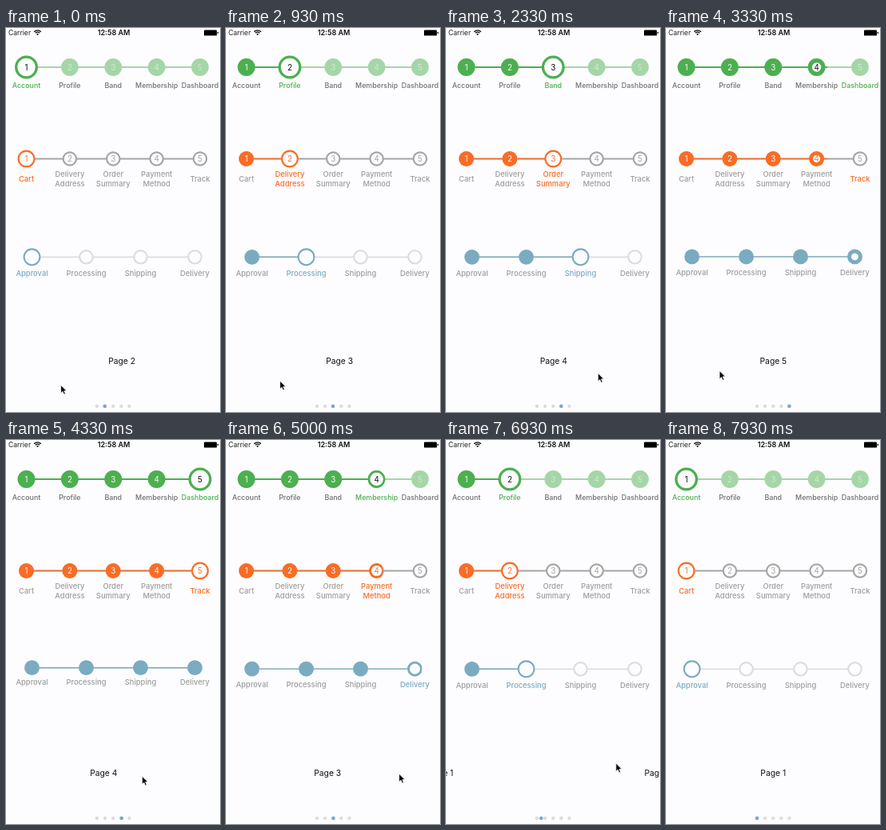
These frames come from a looping animation (268x480 px, 8.34 s). An HTML page:

```html
<!DOCTYPE html>
<html lang="en">
<head>
<meta charset="utf-8">
<title>Step progress bars</title>
<style>
html, body { margin: 0; width: 100%; height: 100%; overflow: hidden; background: #fdfcfe; }
svg { display: block; width: 100%; height: 100%; }
text { font-family: Inter, Roboto, sans-serif; text-anchor: middle; }
</style>
</head>
<body>
<svg id="stage" viewBox="0 0 268 480"></svg>
<script>
const LOOP = 8340, STEP_MS = 410, DRAG_MS = 300, SETTLE_MS = 540;
const PAGES = 5, PAGE_GAP = 272, PAPER = '#fdfcfe';
const stage = document.getElementById('stage');

// Times at which swipes settle: four forward, then four back.
const swipes = [305, 1203, 2335, 3230, 4644, 5260, 6510, 7501]
  .map((at, i) => ({ at, dir: i < 4 ? 1 : -1 }));

// The pointer drags across for each swipe, drifts up slowly, then leaves at the top.
const pointerKeys = swipes.flatMap(({ at, dir }) => {
  const end = at - SETTLE_MS, start = end - DRAG_MS;
  const key = (t, side) => ({ t, x: 142 + side * 75, y: 445 - t / 170 });
  return [key(start, dir), key(end, -dir)];
}).concat({ t: 7780, x: 240, y: 5 });

const thin = {
  text: '#9d9d9d', hollow: true, line: 1.4, idleLine: 1.8,
  r: 9.4, idleR: 8.2, ring: 9.9, ringW: 2.1, font: 9.4
};
const bars = [
  { y: 49, from: 25.5, to: 243, labels: ['Account', 'Profile', 'Band', 'Membership', 'Dashboard'],
    main: '#4caf50', idle: '#a5d6a7', idleNum: '#cfe9d0', selNum: '#111', text: '#707070',
    line: 2.1, idleLine: 2.1, r: 10.9, idleR: 10.9, ring: 12.8, ringW: 3.3, font: 8.9, base: 75 },
  { ...thin, y: 163.5, from: 25.5, to: 243,
    labels: ['Cart', 'Delivery|Address', 'Order|Summary', 'Payment|Method', 'Track'],
    main: '#f96c26', idle: '#a6a6a6', idleNum: '#a6a6a6', selNum: '#f07a3c', base: 192 },
  { ...thin, y: 286.3, from: 32.5, to: 236.5,
    labels: ['Approval', 'Processing', 'Shipping', 'Delivery'],
    main: '#7aabc1', idle: '#dddde0', base: 309.6 }
];

const clamp = v => Math.max(0, Math.min(1, v));
const smooth = u => u * u * (3 - 2 * u);
const mix = (a, b, u) => a + (b - a) * u;

const text = (x, y, size, fill, str, extra = '') =>
  `<text x="${x}" y="${y}" font-size="${size}" fill="${fill}" ${extra}>${str}</text>`;

const circle = (x, y, r, fill, stroke = 'none', w = 0) =>
  `<circle cx="${x}" cy="${y}" r="${r}" fill="${fill}" stroke="${stroke}" stroke-width="${w}"/>`;

const line = (x1, x2, y, w, color) =>
  `<path d="M${x1} ${y}H${x2}" stroke="${color}" stroke-width="${w}"/>`;

// Distance scrolled in one swipe: accelerating drag, then exponential settling.
function swiped(t, at) {
  const x = t - at + SETTLE_MS;
  if (x < 0) return 162 * clamp(x / DRAG_MS + 1) ** 2;
  return x > 700 ? PAGE_GAP : PAGE_GAP - 110 * Math.exp(-x / 102);
}

function drawBar(b, id, q, index) {
  const last = b.labels.length - 1, gap = (b.to - b.from) / last;
  const finished = clamp(q - last);
  const y = b.y - 1.6 * finished, base = b.base - 4 * finished;
  const each = f => b.labels.map((label, k) => f(b.from + k * gap, k, label)).join('');

  let out = line(b.from, b.to, y, b.idleLine, b.idle)
    + each(x => b.hollow ? circle(x, y, b.idleR, PAPER, b.idle, 2.2) : circle(x, y, b.idleR, b.idle));

  // Completed part, revealed up to the current position.
  out += `<clipPath id="c${id}"><rect y="${y - 20}" width="${b.from + q * gap}" height="40"/></clipPath>`
    + `<g clip-path="url(#c${id})">` + line(b.from, b.to, y, b.line, b.main)
    + each(x => circle(x, y, b.r, b.main)) + '</g>';

  return out + each((x, k, label) => {
    const near = clamp(1 - 2 * Math.abs(q - k));
    let s = near ? circle(x, y, b.ring * near, PAPER, b.main, b.ringW * near) : '';
    if (b.idleNum) {
      const fill = near > .5 ? b.selNum : k < q ? '#f8faf5' : b.idleNum;
      s += text(x, y + 3.6, 9.8, fill, k + 1);
    }
    const rows = label.split('|');
    rows.forEach((row, i) => {
      s += text(x, base + (i - (rows.length - 1) / 2) * 11.6, b.font,
        k === index ? b.main : b.text, row, 'font-weight="500"');
    });
    return s;
  });
}

function statusBar() {
  const arc = r => {
    const d = r * .72;
    return `<path d="M${39.5 - d} ${9 - d}A${r} ${r} 0 0 1 ${39.5 + d} ${9 - d}" fill="none" stroke="#111" stroke-width="1.3"/>`;
  };
  return text(3, 9.2, 8.6, '#222', 'Carrier', 'style="text-anchor:start"')
    + arc(6) + arc(3.8) + '<path d="M39.5 9.3l-1.5-1.7a2.2 2.2 0 0 1 3 0z" fill="#111"/>'
    + text(135, 9.3, 9, '#111', '12:58 AM', 'font-weight="600"')
    + '<rect x="248" y="2.4" width="16" height="7.2" rx="1.2"/><rect x="264.6" y="4.8" width="1.3" height="2.4" rx=".6"/>';
}

function drawPointer(t) {
  const i = pointerKeys.findIndex(k => k.t > t);
  if (i < 1) return '';
  const a = pointerKeys[i - 1], b = pointerKeys[i];
  const u = (t - a.t) / (b.t - a.t);
  const e = smooth(i % 2 ? u : u ** 3); // lingers after a drag before moving back
  return `<path transform="translate(${mix(a.x, b.x, e)} ${mix(a.y, b.y, e)})"
    d="M0 0V10.2L2.4 8L4 11.8L5.8 11L4.2 7.3H7.4Z" stroke="#fff" stroke-width=".8"/>`;
}

function draw(now) {
  const t = now % LOOP;
  let scroll = 0, q = 0, index = 0;
  for (const { at, dir } of swipes) {
    scroll += dir * swiped(t, at);
    q += dir * clamp((t - at) / STEP_MS);
    if (t >= at) index += dir;
  }
  let out = statusBar() + bars.map((b, i) => drawBar(b, i, q, index)).join('');
  for (let k = 0; k < PAGES; k++) {
    out += text(134.2 + k * PAGE_GAP - scroll, 419.6, 10.3, '#111', 'Page ' + (k + 1));
    out += circle(114 + k * 10.1, 472.8, 2.2, '#dcdce0');
  }
  out += circle(114 + scroll / PAGE_GAP * 10.1, 472.8, 2.3, '#79a9ca');
  stage.innerHTML = out + drawPointer(t);
  requestAnimationFrame(draw);
}
requestAnimationFrame(draw);
</script>
</body>
</html>
```
